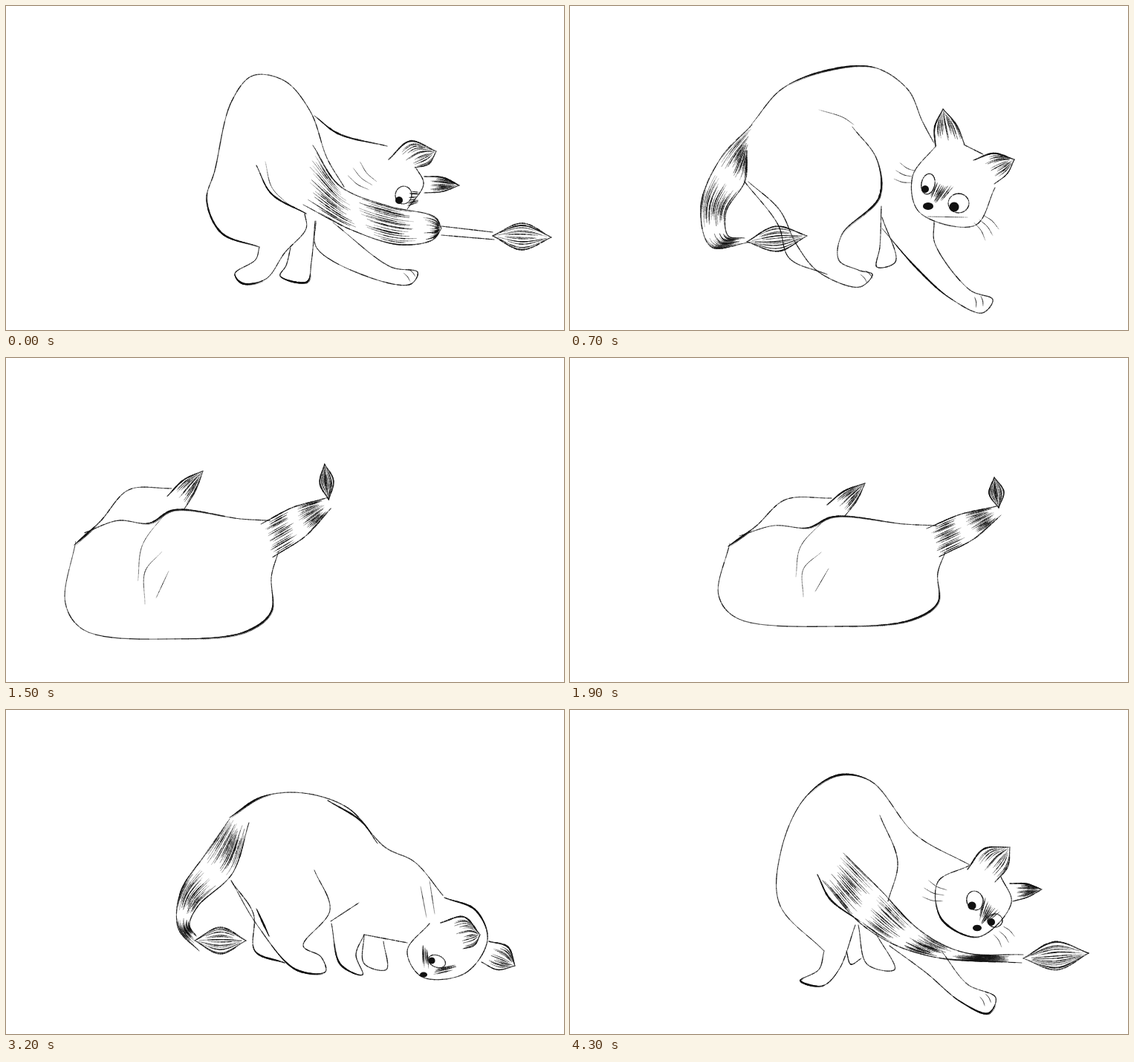
An HTML page with a canvas for the animation above (4400 ms loop, 751 px wide and 437 px high).

```html
<!DOCTYPE html>
<html lang="en">
<head>
<meta charset="utf-8">
<title>Cat chasing its tail</title>
<style>
html, body { margin: 0; width: 100%; height: 100%; overflow: hidden; background: #fff; }
canvas { display: block; width: 751px; height: 437px; }
</style>
</head>
<body>
<canvas id="stage" width="751" height="437"></canvas>
<script>
const ctx = document.getElementById('stage').getContext('2d');
const mix = (a, b, k) => a + (b - a) * k;
let seed = 1;
const rnd = () => (seed = seed * 16807 % 2147483647) / 2147483647;

function toPoints(text) {
  const n = text.split(' ').map(Number);
  return n.filter((_, i) => i % 2 === 0).map((x, i) => [x, n[2 * i + 1]]);
}

// Centripetal Catmull-Rom spline, u in 0..1
function spline(pts) {
  const last = pts.length - 1;
  const gap = (a, b) => Math.sqrt(Math.hypot(a[0] - b[0], a[1] - b[1])) || 1;
  return u => {
    const i = Math.min(Math.floor(u * last), last - 1), t = u * last - i;
    const b = pts[i], c = pts[i + 1];
    const a = pts[i - 1] || b.map((v, j) => 2 * v - c[j]);
    const d = pts[i + 2] || c.map((v, j) => 2 * v - b[j]);
    const p = gap(a, b), q = gap(b, c), r = gap(c, d);
    return [0, 1].map(j => {
      const m = q * ((b[j] - a[j]) / p - (c[j] - a[j]) / (p + q)) + c[j] - b[j];
      const n = q * ((d[j] - c[j]) / r - (d[j] - b[j]) / (q + r)) + c[j] - b[j];
      const e = c[j] - b[j];
      return b[j] + t * (m + t * (3 * e - 2 * m - n + t * (m + n - 2 * e)));
    });
  };
}

let ink;
function stroke(f, n, width, taper, fill) {
  ink.push({ pts: Array.from({ length: n + 1 }, (_, i) => f(i / n)), width, taper, fill });
}

// A contour, pressed harder between from and to
function line(text, from, to) {
  const pts = toPoints(text), f = spline(pts), n = pts.length * 10;
  stroke(f, n, 1.25, 0.15);
  if (!to) return;
  const part = u => f(mix(from, to, u));
  stroke(part, n, 2.3, 0.8);
  stroke(u => part(u).map(v => v + 1.1), n, 0.7, 0.8);
}

const thin = text => stroke(spline(toPoints(text)), 20, 0.8, 0.6);

function hairs(f, g, count, lo = 0, hi = 1) {
  for (let i = 0; i < count; i++) {
    const k = (i + rnd()) / count, size = hi - lo;
    const from = lo + rnd() * size * 0.3, to = hi - rnd() * size * 0.3;
    stroke(u => {
      const v = mix(from, to, u), p = f(v), q = g(v);
      return [mix(p[0], q[0], k), mix(p[1], q[1], k)];
    }, 10, mix(0.8, 1.6, rnd()), 0.7);
  }
}

const fur = (a, b, count) => hairs(spline(toPoints(a)), spline(toPoints(b)), count);

function tube(a, b, bands) {
  line(a);
  line(b);
  const f = spline(toPoints(a)), g = spline(toPoints(b));
  for (let i = 0; i < bands; i++) hairs(f, g, 20, i / bands, (i + 0.85) / bands);
}

function bow(x0, y0, x1, y1, bend) {
  const mid = [(x0 + x1) / 2 + (y1 - y0) * bend, (y0 + y1) / 2 - (x1 - x0) * bend];
  return spline([[x0, y0], mid, [x1, y1]]);
}

function ear(x0, y0, tipX, tipY, x1, y1, bend) {
  const f = bow(x0, y0, tipX, tipY, bend), g = bow(x1, y1, tipX, tipY, -bend * 0.7);
  stroke(f, 24, 2.1, 0.4);
  stroke(g, 24, 1.3, 0.2);
  hairs(f, g, 14, 0.1, 0.95);
}

function tuft(x0, y0, x1, y1, width) {
  const bend = width / Math.hypot(x1 - x0, y1 - y0);
  const f = bow(x0, y0, x1, y1, bend), g = bow(x0, y0, x1, y1, -bend);
  stroke(f, 24, 1.7, 0.3);
  stroke(g, 24, 1.5, 0.3);
  hairs(f, g, 13);
}

function oval(x, y, rx, ry, turn = 0, fill = false) {
  const c = Math.cos(turn), s = Math.sin(turn);
  stroke(u => {
    const a = rx * Math.cos(u * 2 * Math.PI), b = ry * Math.sin(u * 2 * Math.PI);
    return [x + a * c - b * s, y + a * s + b * c];
  }, 24, 1.2, 0, fill);
}

function eye(x, y, rx, ry, turn, px, py, r) {
  oval(x, y, rx, ry, turn);
  oval(px, py, r, r, 0, true);
}

const nose = (x, y, r) => oval(x, y, r, r * 0.7, 0, true);

function fan(x, y, deg, length, gap, count, spread) {
  for (let i = 0; i < count; i++) {
    const k = i - (count - 1) / 2, a = (deg + k * spread) * Math.PI / 180;
    const x0 = x - Math.sin(a) * gap * k - Math.cos(a) * length / 2;
    const y0 = y + Math.cos(a) * gap * k - Math.sin(a) * length / 2;
    stroke(bow(x0, y0, x0 + Math.cos(a) * length, y0 + Math.sin(a) * length, 0.08), 14, 0.8, 0.6);
  }
}
const whiskers = (x, y, deg, length) => fan(x, y, deg, length, 10, 3, 8);
const toes = (x, y, deg) => fan(x + 5, y + 5, deg, 14, 9, 2, 5);

const poses = {
  reach() {
    line('341 325 290 306 270 262 281 222 303 130 332 94 375 101 410 143 432 205 455 244', 0, 0.25);
    line('415 148 447 172 513 189', 0.1, 0.9);
    line('341 325 336 342 308 361 318 374 350 368 375 333 404 300 402 280', 0.3, 0.55);
    line('383 326 377 350 369 364 405 372 411 345 416 290', 0.4, 0.7);
    line('417 290 418 326 495 368 545 375 554 359 518 352 440 292');
    toes(538, 358, 50);
    line('337 215 357 253 404 280', 0.2, 1);
    thin('349 210 358 245 385 272');
    ear(515, 207, 579, 196, 550, 218, 0.3);
    line('551 217 562 240 540 274');
    ear(563, 230, 610, 242, 563, 252, 0.1);
    eye(535, 255, 11, 12, 0.2, 529, 262, 5);
    fur('545 247 560 250', '537 272 554 266', 8);
    whiskers(480, 230, 222, 34);
    tube('413 188 450 243 515 270 578 285 586 300', '400 268 465 302 530 322 575 315 586 300', 3);
    line('586 297 655 305');
    line('586 309 657 315');
    tuft(655, 310, 734, 312, 18);
  },
  front() {
    line('244 160 285 112 345 87 410 83 455 113 474 155 490 185', 0.2, 0.5);
    line('380 163 413 207 416 258 366 308 362 343 390 357', 0.2, 0.6);
    line('390 357 407 362 390 379 335 359 305 322 282 275 240 237');
    line('235 237 280 295 295 340 346 362');
    line('419 270 417 325 413 352 438 345 420 285');
    line('420 300 465 352 510 393 555 414 569 396 538 383 491 320 490 292', 0.05, 0.3);
    toes(545, 394, 80);
    toes(394, 360, 50);
    thin('335 140 367 150 382 160');
    line('493 188 461 230 470 278 545 296 572 245');
    line('530 187 556 200');
    ear(492, 190, 502, 139, 531, 187, 0.12);
    ear(543, 208, 598, 207, 571, 240, 0.16);
    eye(482, 240, 9, 14, 0.2, 478, 247, 5);
    eye(523, 266, 14, 13, 0, 517, 271, 6.5);
    nose(482, 270, 7);
    fur('490 238 482 262', '520 240 497 267', 12);
    thin('480 284 535 285');
    whiskers(450, 226, 200, 24);
    whiskers(560, 299, 50, 28);
    tube('245 160 203 205 176 270 190 325 240 319', '238 195 236 235 210 278 213 310 235 313', 3);
    tuft(238, 318, 319, 310, 17);
  },
  wash() {
    line('342 118 390 101 455 131 491 195 488 255 465 303 378 351', 0.3, 0.45);
    line('300 150 243 215 172 288', 0.3, 0.8);
    fur('232 227 176 284', '244 262 200 277', 12);
    line('145 288 215 272 315 241');
    line('150 316 230 305 330 303 418 287', 0.6, 1);
    line('418 287 447 280');
    line('148 316 92 333 78 308 120 277 148 290');
    oval(116, 294, 12, 5);
    oval(98, 302, 10, 7);
    oval(97, 317, 12, 6);
    oval(128, 310, 16, 8);
    line('281 307 288 345 360 366 374 350');
    line('365 346 328 350 340 318 415 288');
    line('283 330 325 333');
    ear(340, 117, 258, 120, 305, 150, 0.06);
    ear(399, 155, 309, 163, 370, 177, -0.2);
    line('306 150 308 190 320 232 335 250 390 246 428 227');
    eye(339, 209, 17, 9, 0.8, 341, 214, 6);
    nose(320, 240, 5);
    fur('320 225 345 240', '345 230 373 212', 8);
    whiskers(435, 190, -30, 48);
    tube('16 351 45 337 75 345 90 358 136 347', '16 351 50 380 95 383 125 372 142 354', 2);
    fur('195 310 130 348', '207 307 161 361', 12);
    line('137 350 149 358 164 358');
  },
  away() {
    line('215 250 200 320 225 351 360 362 460 353 495 330 495 290 505 262', 0.45, 0.8);
    line('228 240 275 226 320 229 355 214 450 224 493 226', 0.35, 0.75);
    line('213 254 250 227 290 191 352 189', 0, 0.3);
    ear(346, 198, 397, 169, 370, 213, 0.08);
    thin('345 216 310 255 304 295');
    thin('338 262 314 285 314 322');
    thin('348 284 330 315');
    tube('480 230 525 211 574 200', '497 268 545 243 580 212', 2);
    tuft(577, 202, 571, 161, 10);
  },
  crouch() {
    line('312 260 298 215 312 157 365 130 430 163 478 212', 0.1, 0.3);
    line('312 258 325 303 365 324 411 329', 0.3, 0.8);
    line('411 329 372 344 382 363 440 356 470 308 480 283', 0.4, 0.7);
    line('380 326 364 335 374 346');
    thin('410 245 435 272 468 268');
    line('475 199 520 220 577 252', 0.1, 0.9);
    ear(528, 240, 577, 252, 533, 261, 0.08);
    line('473 290 490 312 508 310 510 295');
    nose(502, 311, 5);
    whiskers(507, 218, -68, 30);
    tube('465 195 515 245 570 290 638 315', '450 268 510 297 570 333 630 343', 3);
    line('638 315 630 343');
    line('632 322 680 335', 0, 1);
    line('636 332 680 347');
    tuft(680, 336, 706, 372, 13);
  },
  stalk() {
    line('301 145 345 117 400 112 460 132 510 185 550 205 588 250', 0, 0.2);
    line('433 122 478 150 500 180', 0, 0.8);
    thin('558 238 566 280');
    thin('570 230 577 275');
    line('303 230 338 290 390 350 430 353 424 333 400 318 436 270 415 216', 0.2, 0.4);
    line('304 232 333 275 335 325 375 341', 0.6, 1);
    line('337 268 354 305', 0, 1);
    line('437 285 475 260');
    line('438 288 450 343 480 357 471 330 482 303', 0.1, 0.45);
    line('482 303 482 342 512 350 508 312');
    line('482 303 540 314');
    line('590 253 632 270 648 310 618 355 560 360 540 325 570 288', 0, 0.3);
    ear(585, 287, 638, 303, 615, 322, 0.3);
    ear(650, 312, 685, 345, 640, 340, 0.25);
    eye(580, 339, 12, 8, 0.4, 573, 338, 4.5);
    nose(562, 357, 5);
    fur('559 316 560 350', '567 320 569 350', 6);
    fur('573 351 605 343', '572 359 607 350', 5);
    tube('301 147 268 195 235 245 232 295 260 325', '327 152 305 220 258 265 247 290 256 305', 3);
    tuft(254, 311, 323, 311, 18);
  },
  glance() {
    line('342 325 282 262 284 190 315 120 360 88 405 96 465 168 538 209', 0.45, 0.7);
    line('417 142 441 205 428 258');
    line('342 325 335 350 310 365 340 372 362 350 384 290', 0.35, 0.6);
    line('388 290 400 343 437 350 412 302');
    line('372 325 378 343 392 335');
    line('430 318 480 355 525 393 563 409 573 388 535 370 500 325', 0.3, 0.6);
    toes(554, 386, 60);
    line('537 210 495 232 500 282 550 306 594 260 580 225', 0.3, 0.6);
    ear(535, 215, 592, 185, 572, 232, 0.22);
    ear(592, 234, 635, 242, 596, 258, 0.08);
    eye(545, 257, 11, 13, -0.3, 541, 264, 5.5);
    eye(572, 284, 10, 9, 0, 567, 286, 5);
    nose(548, 294, 6);
    fur('555 250 549 286', '583 270 557 290', 12);
    whiskers(490, 245, 200, 28);
    whiskers(584, 306, 50, 20);
    line('333 222 350 255 390 285', 0, 1);
    tube('368 193 420 245 472 298 530 327 610 330', '340 230 390 287 440 318 500 335 608 341', 4);
    tuft(610, 335, 698, 328, 19);
  }
};

// Key poses; a box moves and squeezes the pose
const keys = [
  [0, 'reach'], [100, 'glance'], [300, 'glance', 277, 82, 650, 414], [700, 'front'],
  [1100, 'wash'], [1400, 'wash', 76, 142, 443, 382], [1500, 'away', 79, 143, 441, 380],
  [1900, 'away'], [2400, 'crouch'], [2800, 'crouch', 317, 108, 681, 371],
  [3000, 'stalk', 317, 112, 681, 387], [3200, 'stalk'], [3600, 'stalk', 190, 106, 660, 366],
  [3700, 'front', 145, 107, 560, 366], [3800, 'wash', 78, 125, 485, 366],
  [3900, 'away', 130, 148, 510, 362], [4100, 'crouch', 240, 115, 680, 366],
  [4200, 'reach', 262, 92, 700, 385], [4300, 'glance']
];
// Tenths of a second in which the drawing before is held
const holds = [2, 4, 8, 16, 25, 27, 29, 31, 33, 35];

const art = {};
for (const name in poses) {
  ink = [];
  seed = 99;
  poses[name]();
  const all = ink.flatMap(s => s.pts), xs = all.map(p => p[0]), ys = all.map(p => p[1]);
  art[name] = { ink, box: [Math.min(...xs), Math.min(...ys), Math.max(...xs), Math.max(...ys)] };
}

function paint({ pts, width, taper, fill }, place) {
  const p = pts.map(place), n = p.length - 1;
  if (fill) {
    ctx.globalAlpha = 1;
    ctx.beginPath();
    p.forEach(q => ctx.lineTo(...q));
    ctx.fill();
    return;
  }
  for (let i = 1; i <= n; i++) {
    ctx.globalAlpha = mix(0.6, 1, rnd());
    ctx.lineWidth = width * mix(0.75, 1.2, rnd()) * mix(1, Math.sin(Math.PI * (i - 0.5) / n), taper);
    ctx.beginPath();
    ctx.moveTo(...p[i - 1]);
    ctx.lineTo(...p[i]);
    ctx.stroke();
  }
}

const boxOf = ([, name, ...box]) => box.length ? box : art[name].box;

function draw(time) {
  const i = keys.findLastIndex(k => k[0] <= time);
  const a = keys[i], b = keys[i + 1] || a;
  const k = a === b ? 0 : (time - a[0]) / (b[0] - a[0]);
  const pose = art[k > 0.5 ? b[1] : a[1]], to = boxOf(b);
  const [l, t, r, d] = boxOf(a).map((v, j) => mix(v, to[j], k));
  const [x0, y0, x1, y1] = pose.box;
  const place = ([x, y]) => [mix(l, r, (x - x0) / (x1 - x0)), mix(t, d, (y - y0) / (y1 - y0))];
  seed = time + 77;
  ctx.globalAlpha = 1;
  ctx.fillStyle = '#fff';
  ctx.fillRect(0, 0, 751, 437);
  ctx.fillStyle = ctx.strokeStyle = '#111';
  ctx.lineCap = 'round';
  pose.ink.forEach(s => paint(s, place));
}

const start = performance.now();
let shown;
function tick() {
  let step = Math.floor((performance.now() - start) % 4400 / 100);
  if (holds.includes(step)) step--;
  if (step !== shown) draw((shown = step) * 100);
  requestAnimationFrame(tick);
}
tick();
</script>
</body>
</html>
```
